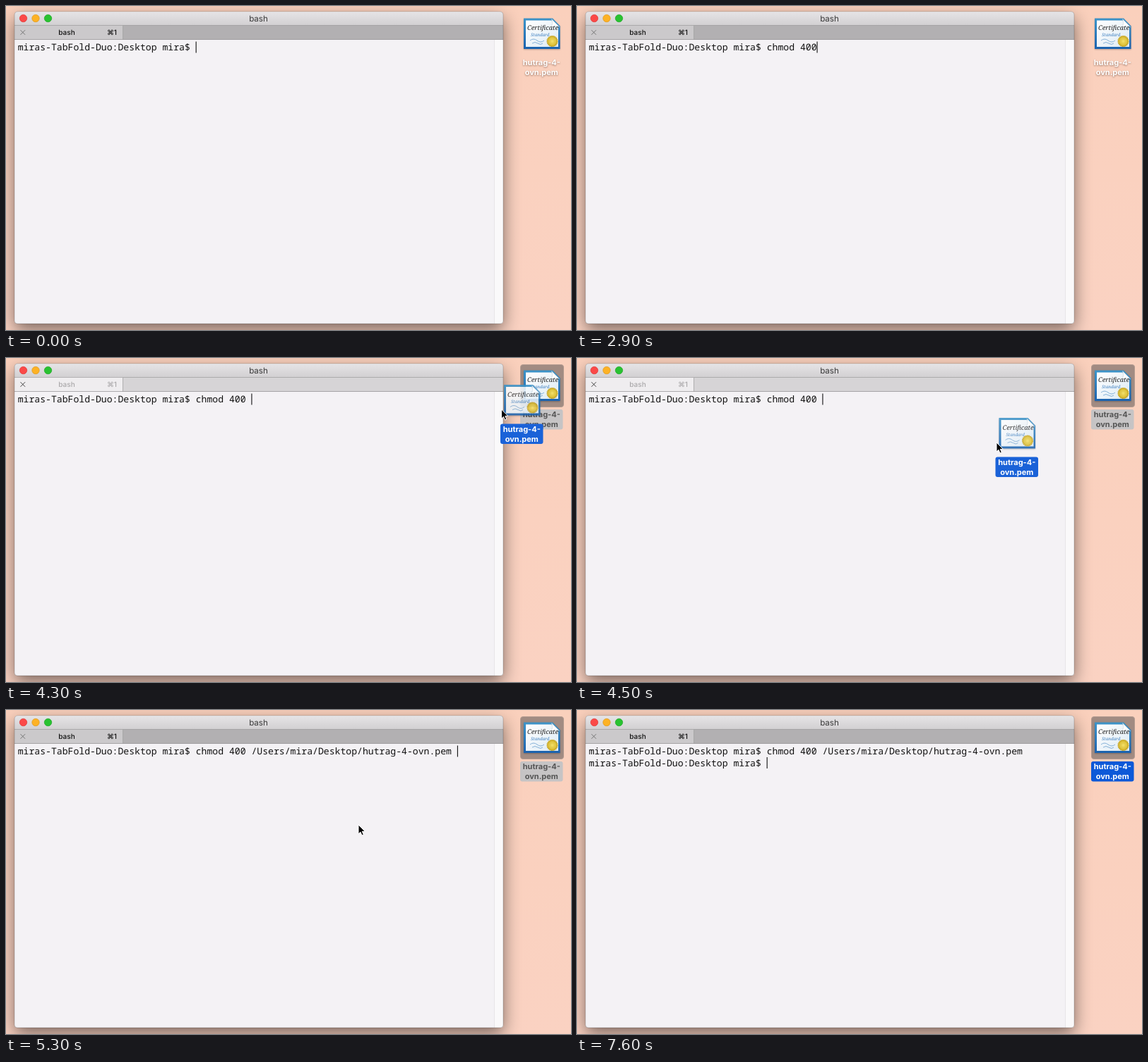
Write an HTML page that moves like this. It is 800 px wide and 460 px high and loops after 7700 ms.

```html
<!DOCTYPE html>
<html lang="en">
<head>
<meta charset="utf-8">
<title>Terminal</title>
<style>
html, body { margin: 0; width: 100%; height: 100%; overflow: hidden; background: #fad1bf; }
svg { display: block; width: 800px; height: 460px; }
text { text-rendering: geometricPrecision; white-space: pre; }
.ui { font-family: Inter, Roboto, sans-serif; text-anchor: middle; }
.term { font: 13.13px "Noto Sans Mono", "DejaVu Sans Mono", monospace; fill: #111; }
.name { font-weight: 700; font-size: 11px; }
.script { font-family: "Noto Serif", "Liberation Serif", serif; font-style: italic; }
</style>
</head>
<body>
<svg viewBox="0 0 800 460" xmlns="http://www.w3.org/2000/svg">
  <defs>
    <linearGradient id="desk" x1="0" y1="0" x2="0" y2="1">
      <stop offset="0" stop-color="#fad0bc"/><stop offset="1" stop-color="#fad2c2"/>
    </linearGradient>
    <linearGradient id="bar" x1="0" y1="0" x2="0" y2="1">
      <stop offset="0" stop-color="#e6e4e6"/><stop offset="1" stop-color="#d1cfd1"/>
    </linearGradient>
    <linearGradient id="frame" x1="0" y1="0" x2="0" y2="1">
      <stop offset="0" stop-color="#3d94c8"/><stop offset="1" stop-color="#1b62ae"/>
    </linearGradient>
    <linearGradient id="paper" x1="0" y1="0" x2="1" y2="1">
      <stop offset="0" stop-color="#ffffff"/><stop offset="1" stop-color="#dceaf4"/>
    </linearGradient>
    <radialGradient id="gold">
      <stop offset="0" stop-color="#f5e26a"/><stop offset="1" stop-color="#cfae25"/>
    </radialGradient>
    <filter id="blur" x="-20%" y="-20%" width="140%" height="140%"><feGaussianBlur stdDeviation="12"/></filter>
    <filter id="soft" x="-20%" y="-30%" width="140%" height="160%"><feGaussianBlur stdDeviation="1"/></filter>
    <clipPath id="win"><path d="M12 451V13q0-5 5-5H699q5 0 5 5V447q0 4-4 4H16q-4 0-4-4z"/></clipPath>

    <g id="icon">
      <path d="M733 18.5H774L784.5 29V62H733z" fill="#000" opacity=".25" filter="url(#soft)"/>
      <path d="M733 17.5H774L784.5 28.5V61H733z" fill="url(#frame)"/>
      <path d="M736 20.5H772.5L782 30V58H736z" fill="url(#paper)"/>
      <path d="M772.5 18.5q2.5 6-.5 12 6-3.5 11.5-1z" fill="#fff" stroke="#b9cbd6" stroke-width=".5"/>
      <text class="script" x="738" y="34" font-size="9.2" fill="#222">Certificate</text>
      <text class="script" x="743" y="43" font-size="6.2" fill="#3d7fc0">Standard</text>
      <path d="M742 49q5-4 10 0t10 0M745 53q4-3 8 0t7 0" fill="none" stroke="#79a9d3" stroke-width=".9"/>
      <circle cx="773.5" cy="50" r="7.4" fill="url(#gold)" stroke="#c5a526" stroke-width="1.3" stroke-dasharray="1.6 .8"/>
      <circle cx="773.5" cy="50" r="4.6" fill="none" stroke="#e9d04a" stroke-width=".8"/>
    </g>
    <g id="label" class="ui name">
      <text x="758.3" y="84">hutrag-4-</text>
      <text x="758.3" y="98">ovn.pem</text>
    </g>
    <rect id="plate" x="728" y="73" width="60.5" height="28.5" rx="3"/>
  </defs>

  <rect width="800" height="460" fill="url(#desk)"/>

  <rect id="select" x="728.5" y="9.5" width="61" height="60" rx="3.5" fill="#a18b82" stroke="#b39b90"/>
  <use href="#icon"/>
  <use id="tagPlate" href="#plate"/>
  <use id="tagShade" href="#label" fill="#5a3a2e" opacity=".6" y="1" filter="url(#soft)"/>
  <use id="tagText" href="#label"/>

  <rect x="12" y="17" width="692" height="443" rx="6" opacity=".5" filter="url(#blur)"/>
  <g clip-path="url(#win)">
    <rect x="12" y="8" width="692" height="443" fill="#f4f2f5"/>
    <rect x="12" y="8" width="692" height="20" fill="url(#bar)"/>
    <path d="M12 8.5H704" stroke="#f3f1f3"/>
    <rect id="tabs" x="12" y="27" width="692" height="21"/>
    <rect id="tab" x="12" y="27" width="153.5" height="21"/>
    <path d="M12 27.5H704M165.5 28V48" stroke="#a3a1a3" stroke-width=".8"/>
    <path d="M12 47.5H704" stroke="#9c9a9c" stroke-width=".8"/>
    <rect x="691" y="48" width="13" height="403" fill="#faf9fa"/>
    <path d="M691.5 48V451" stroke="#e7e5e8"/>
  </g>
  <path d="M12 447V13q0-5 5-5H699q5 0 5 5V447q0 4-4 4H16q-4 0-4-4z" fill="none" stroke="#000" stroke-opacity=".28" stroke-width=".7"/>
  <g stroke-width=".7">
    <circle cx="24.5" cy="17.5" r="5.2" fill="#fb4948" stroke="#dd3a38"/>
    <circle cx="42" cy="17.5" r="5.2" fill="#fdb225" stroke="#dd981c"/>
    <circle cx="59.5" cy="17.5" r="5.2" fill="#29c231" stroke="#1fa526"/>
  </g>
  <text class="ui" x="357.5" y="22" font-size="11.6" fill="#3a3a3a">bash</text>
  <path id="close" d="M20.5 34.2l6.6 6.6m0-6.6l-6.6 6.6" stroke-width="1"/>
  <g id="tabText" class="ui" font-size="10" font-weight="500">
    <text x="86" y="41.3">bash</text>
    <text x="150" y="41.3">⌘1</text>
  </g>

  <text id="line1" class="term" x="16.7" y="63"></text>
  <text id="line2" class="term" x="16.7" y="79.6"></text>
  <rect id="caret" width="1.1" height="16" fill="#111"/>

  <g id="ghost">
    <use href="#icon" opacity=".88"/>
    <use href="#plate" fill="#1a62d8"/>
    <use href="#label" fill="#fff"/>
  </g>
  <g id="beam" fill="none">
    <path id="beamShape" d="M-3-6.5q3 0 3 2 0-2 3-2M0-4.5V4.5M-3 6.5q3 0 3-2 0 2 3 2M-1.6 1.5H1.6" stroke="#fff" stroke-width="2.4" opacity=".7"/>
    <path d="M-3-6.5q3 0 3 2 0-2 3-2M0-4.5V4.5M-3 6.5q3 0 3-2 0 2 3 2M-1.6 1.5H1.6" stroke="#111" stroke-width="1.1"/>
  </g>
  <path id="arrow" d="M0 0V13L3 10.3 5 15 7.3 14 5.3 9.4H9.4z" fill="#000" stroke="#fff" stroke-width="1"/>
</svg>
<script>
const LOOP = 7700, STEP = 100, ADV = 7.878, LEFT = 16.7;
const PROMPT = "miras-TabFold-Duo:Desktop mira$ ";
const TYPED = "chmod 400 ";
const FILE = "/Users/mira/Desktop/hutrag-4-ovn.pem ";
const KEYS = [100, 200, 400, 500, 1000, 2000, 2300, 2500, 2700, 3000];
const GRAB = 4200, DROP = 4700, PASTE = 4800, ENTER = 6000, FOCUS = 7600;
const MOUSE_IN = 3600;

// Pointer path: time, x, y
const PATH = [
  [3600, 641, 63], [3800, 654, 59], [3900, 692, 57], [4000, 733, 54],
  [4100, 738, 51], [4200, 729, 52.5], [4300, 701.5, 73], [4400, 651, 98],
  [4500, 594, 120], [4600, 550, 131], [4700, 537, 130], [4900, 519, 152],
  [5100, 501, 163], [5300, 499, 163]
];

const $ = id => document.getElementById(id);
const set = (id, name, value) => $(id).setAttribute(name, value);
const show = (id, on) => set(id, "visibility", on ? "visible" : "hidden");
const move = (id, x, y) => set(id, "transform", `translate(${x} ${y})`);

function pointer(t) {
  const i = PATH.findIndex(p => p[0] > t);
  if (i < 0) return PATH[PATH.length - 1].slice(1);
  if (i === 0) return PATH[0].slice(1);
  const [a, b] = [PATH[i - 1], PATH[i]];
  const k = (t - a[0]) / (b[0] - a[0]);
  return [a[1] + (b[1] - a[1]) * k, a[2] + (b[2] - a[2]) * k];
}

function drawTerminal(t) {
  const count = KEYS.filter(k => k <= t).length;
  const line = PROMPT + TYPED.slice(0, count) + (t >= PASTE ? FILE : "");
  const done = t >= ENTER;
  $("line1").textContent = line;
  $("line2").textContent = done ? PROMPT : "";
  set("caret", "x", LEFT + (done ? PROMPT : line).length * ADV - 0.2);
  set("caret", "y", done ? 67 : 50.5);

  const active = t < GRAB || t >= PASTE;
  set("tabs", "fill", active ? "#b2b0b2" : "#d6d4d6");
  set("tab", "fill", active ? "#cbc9cb" : "#efedef");
  set("tabText", "fill", active ? "#111" : "#aaa8aa");
  set("close", "stroke", active ? "#777" : "#444");
}

function drawFile(t) {
  const picked = t >= GRAB, blue = t >= FOCUS;
  show("select", picked);
  show("tagPlate", picked);
  show("tagShade", !picked);
  set("tagPlate", "fill", blue ? "#0d59d8" : "#c6c4c5");
  set("tagText", "fill", picked && !blue ? "#555" : "#fff");
}

function drawPointer(t) {
  const [x, y] = pointer(t);
  const seen = t >= MOUSE_IN && t < ENTER;
  const drag = t >= GRAB && t < DROP;
  const beam = t < 4000 || (t >= DROP && t < 5000);
  show("ghost", drag);
  show("beam", seen && beam);
  show("arrow", seen && !beam);
  move("ghost", x - 729.5, y - 52.5);
  move("beam", x, y);
  move("arrow", x, y);
}

function draw(ms) {
  const t = Math.floor((ms % LOOP) / STEP) * STEP;
  drawTerminal(t);
  drawFile(t);
  drawPointer(t);
}

const start = performance.now();
function tick() {
  draw(performance.now() - start);
  requestAnimationFrame(tick);
}
tick();
</script>
</body>
</html>
```
